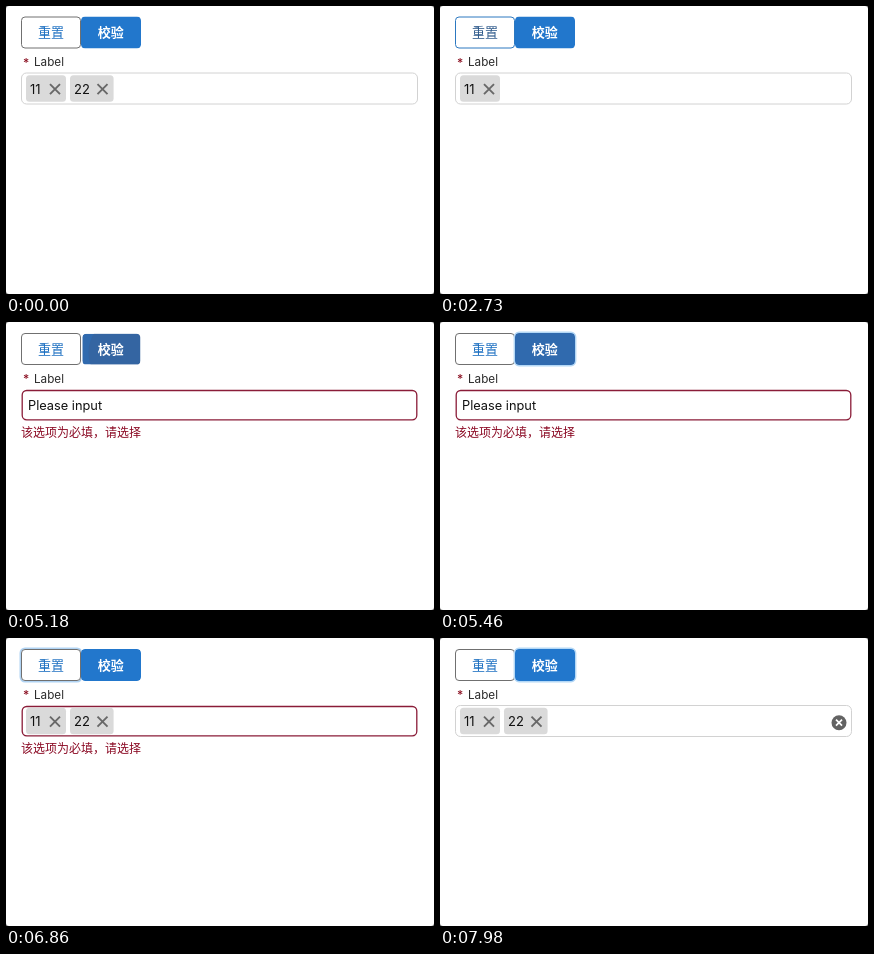
An HTML page that plays this animation: 428x288 px, repeating every 8000 ms.

```html
<!DOCTYPE html>
<html lang="zh">
<head>
<meta charset="utf-8">
<style>
  html, body { margin: 0; width: 100%; height: 100%; overflow: hidden; background: #5a5a5a; }
  svg { display: block; width: 428px; height: 288px; font-family: Inter, "Noto Sans CJK SC", "Noto Sans CJK", sans-serif; }
  .cjk { font-family: "Noto Sans CJK SC", "Noto Sans CJK", sans-serif; }
  .chip rect { fill: #dadada; }
  .cross { fill: none; stroke: #686868; stroke-width: 1.9; }
  #check { transform-box: fill-box; transform-origin: center; }
</style>
</head>
<body>
<svg viewBox="0 0 428 288">
  <defs>
    <clipPath id="resetClip"><rect x="15.5" y="11" width="59" height="31" rx="3.5"/></clipPath>
    <clipPath id="checkClip"><rect x="75" y="10.5" width="60" height="32" rx="4"/></clipPath>
  </defs>
  <rect width="428" height="288" rx="3" fill="#fff"/>
  <g id="form">
    <rect id="resetRing" x="14.5" y="10" width="61" height="33" rx="4.5" fill="none" stroke="#8fc0ee" stroke-width="2"/>
    <rect id="resetBox" x="15.5" y="11" width="59" height="31" rx="3.5" fill="#fff"/>
    <text id="resetText" class="cjk" x="32" y="31.3" font-size="13">重置</text>
    <circle id="resetWave" cx="38.4" cy="32.5" fill="#2a70c0" clip-path="url(#resetClip)"/>

    <rect id="checkRing" x="74.5" y="10" width="61" height="33" rx="4.5" fill="none" stroke="#b4d8f6" stroke-width="1.8"/>
    <g id="check" clip-path="url(#checkClip)">
      <rect id="checkBox" x="75" y="10.5" width="60" height="32" rx="4"/>
      <circle id="checkWave" cx="118" cy="30" fill="#3a5c90"/>
    </g>
    <text class="cjk" x="91.8" y="31.3" font-size="13" font-weight="600" fill="#fff">校验</text>

    <text x="17" y="60.9" font-size="12" font-weight="500" fill="#8b1022">*</text>
    <text x="28" y="60.2" font-size="11.7" fill="#2b2b2b">Label</text>

    <rect id="field" x="15.5" y="67" width="396" height="31" rx="5" fill="#fff"/>
    <rect id="errorField" x="16.2" y="68" width="394.6" height="29.3" rx="4.5" fill="#fff" stroke="#8a1c38" stroke-width="1.3"/>
    <text id="hint" x="22" y="87.6" font-size="12.8" fill="#111">Please input</text>
    <g id="chipA" class="chip">
      <rect x="20" y="69.3" width="40" height="26.5" rx="3.5"/>
      <text x="24" y="87.8" font-size="13" fill="#111">11</text>
      <path class="cross" d="M44 78.2l10 10m0-10l-10 10"/>
    </g>
    <g id="chipB" class="chip">
      <rect x="64" y="69.3" width="43.6" height="26.5" rx="3.5"/>
      <text x="68" y="87.8" font-size="13" fill="#111">22</text>
      <path class="cross" d="M91.5 78.2l10 10m0-10l-10 10"/>
    </g>
    <g id="clear">
      <circle cx="399" cy="84.2" r="7.5" fill="#636363"/>
      <path d="M396 81.2l6 6m0-6l-6 6" stroke="#fff" stroke-width="1.7"/>
    </g>
    <text id="error" class="cjk" x="15" y="114.8" font-size="12" fill="#8b0a24">该选项为必填，请选择</text>
  </g>
</svg>
<script>
const LOOP = 8000, TICK = 70;
const $ = id => document.getElementById(id);
const clamp = v => Math.max(0, Math.min(1, v));
const ramp = (t, from, to) => clamp((t - from) / (to - from));
const within = (t, spans) => spans.some(([a, b]) => t >= a && t < b);
const show = (id, on) => $(id).style.opacity = +on;
const paint = (id, attr, value) => $(id).setAttribute(attr, value);

function mix(a, b, k) {
  return `rgb(${a.map((v, i) => Math.round(v + (b[i] - v) * k))})`;
}

// Rises over [a, b], holds, falls over [c, d].
const pulse = (t, [a, b, c, d]) => ramp(t, a, b) * (1 - ramp(t, c, d));

function wave(id, t, start, length, radius, alpha) {
  const k = (t - start) / length;
  const live = k > 0 && k < 1;
  paint(id, 'r', live ? radius * k : 0);
  $(id).style.opacity = live ? alpha * (1 - k) : 0;
}

function draw(time) {
  const t = Math.floor(time / TICK) * TICK;
  const empty = within(t, [[4340, 6440]]);
  const error = within(t, [[5180, 7490]]);

  paint('form', 'transform', `translate(0 ${t >= 4340 ? 0.5 : 0})`);
  show('chipA', !empty);
  show('chipB', !empty && !within(t, [[1820, 4340]]));
  show('hint', empty);
  show('error', error);
  show('errorField', error);
  show('clear', within(t, [[1260, 2170], [3570, 3780], [3990, 4340], [7910, LOOP]]));
  paint('field', 'stroke', error ? 'none' : '#d2d2d2');

  const over = Math.max(pulse(t, [2729, 2730, 3360, 3570]), pulse(t, [6089, 6090, 6720, 6860]));
  paint('resetBox', 'stroke', mix([112, 112, 112], [44, 120, 192], over));
  paint('resetText', 'fill', mix([26, 110, 192], [44, 88, 138], over));
  $('resetRing').style.opacity = 0.7 * pulse(t, [6510, 6650, 7140, 7280]);
  wave('resetWave', t, 6370, 490, 57, 0.45);

  const dark = Math.max(pulse(t, [4830, 5110, 5460, 5530]), pulse(t, [7070, 7630, 7770, 7980]));
  paint('checkBox', 'fill', mix([34, 119, 204], [48, 106, 174], dark));
  $('checkRing').style.opacity = Math.max(pulse(t, [5180, 5390, 6300, 6440]), pulse(t, [7420, 7630, 8100, 8200]));
  const pressed = within(t, [[5110, 5250], [7350, 7490]]);
  $('check').style.transform = `scale(${pressed ? 0.967 : 1})`;
  wave('checkWave', t, t < 6000 ? 5040 : 7280, 420, 110, 0.6);
}

function frame(now) {
  draw(now % LOOP);
  requestAnimationFrame(frame);
}
draw(0);
requestAnimationFrame(frame);
</script>
</body>
</html>
```
